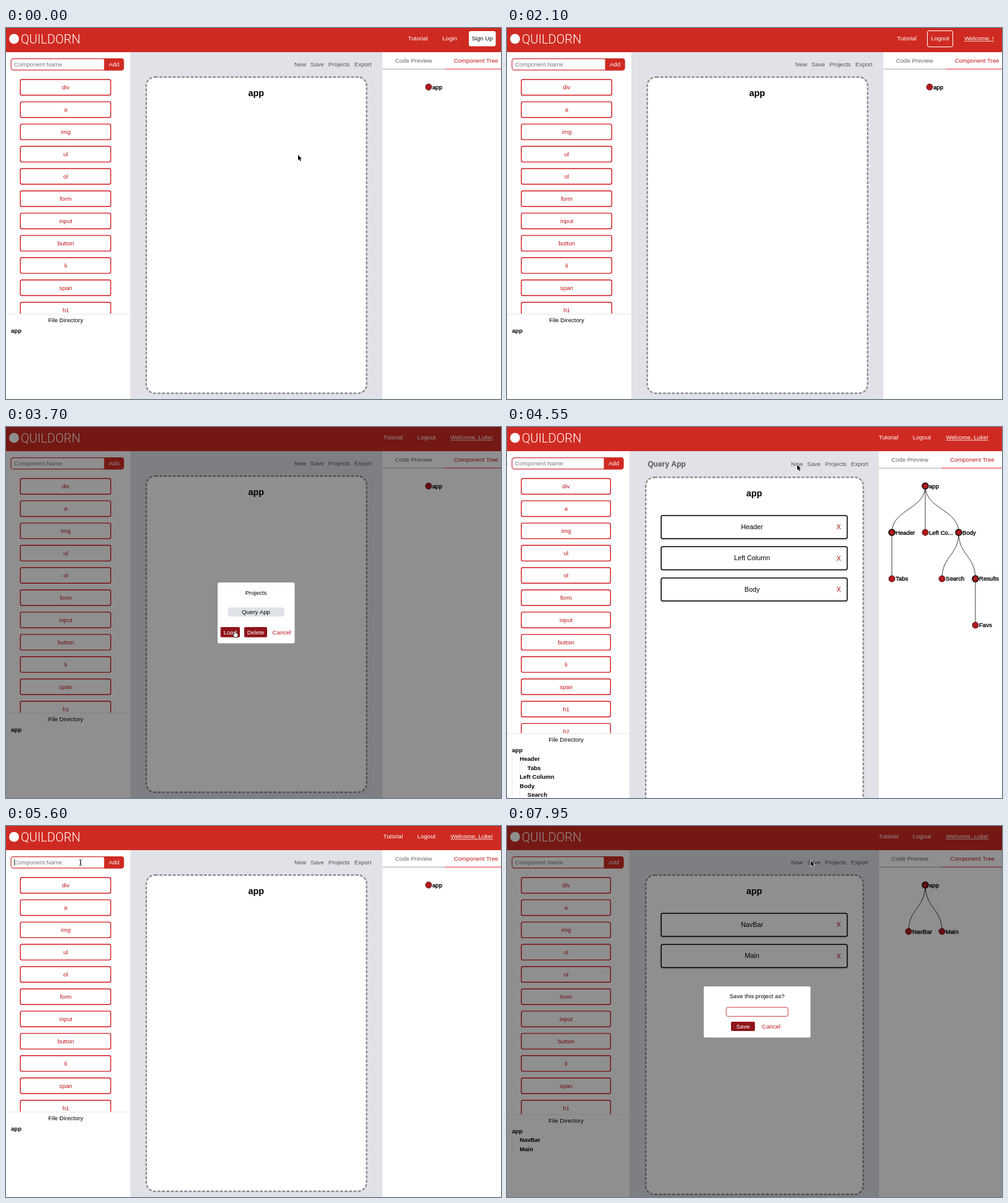
Animation, 800 px wide and 599 px high, one loop 8000 ms. Source, as an HTML page with a canvas:

```html
<!DOCTYPE html>
<html lang="en">
<head>
<meta charset="utf-8">
<title>Component builder</title>
<style>
html, body { margin: 0; width: 100%; height: 100%; overflow: hidden; background: #fff; }
canvas { display: block; width: 800px; height: 599px; }
</style>
</head>
<body>
<canvas id="stage"></canvas>
<script>
const LOOP = 8000;
const SANS = '"Liberation Sans", Arial, sans-serif';
const BRAND = 'Quildorn', USER = 'Luke';
const RED = '#cf2a22', LINE_RED = '#d4191f', TEXT_RED = '#c01418', DARK_RED = '#8f1419', NODE_RED = '#b01a1e';

const canvas = document.getElementById('stage');
const ctx = canvas.getContext('2d');
const ratio = window.devicePixelRatio || 1;
canvas.width = 800 * ratio;
canvas.height = 599 * ratio;

// nodes: name, x offset from the root, depth, parent index
const EMPTY = { narrow: false, title: '', dirTop: 462, bottom: 590, nodes: [['app', 0, 0]] };
const QUERY = {
  narrow: true, title: 'Query App', dirTop: 495, bottom: 640,
  nodes: [['app', 0, 0], ['Header', -54, 1, 0], ['Tabs', -54, 2, 1], ['Left Column', 0, 1, 0],
    ['Body', 54, 1, 0], ['Search', 27, 2, 4], ['Results', 81, 2, 4], ['Favs', 81, 3, 6]]
};
const ONE = { ...EMPTY, nodes: [['app', 0, 0], ['NavBar', 0, 1, 0]] };
const TWO = {
  narrow: true, title: '', dirTop: 466, bottom: 595,
  nodes: [['app', 0, 0], ['NavBar', -27, 1, 0], ['Main', 27, 1, 0]]
};
const PROJECTS = [[0, EMPTY], [3800, QUERY], [4900, EMPTY], [6350, ONE], [7050, TWO]];

// pointer: time, x, y
const POINTER = [[0, 472, 205], [50, 472, 205], [600, 716, 14], [2250, 716, 14], [2700, 540, 57],
  [2850, 540, 57], [3250, 404, 297], [3400, 404, 297], [3650, 370, 330], [4100, 370, 330],
  [4500, 469, 61], [4900, 469, 61], [5550, 120.5, 59], [7150, 120.5, 59], [7700, 491, 56], [8000, 491, 56]];
const TYPING = [[900, 2250], [5750, 7150]];

const within = (t, a, b) => t >= a && t < b;
const clamp = v => Math.max(0, Math.min(1, v));
const typed = (t, start, word, step) => word.slice(0, Math.max(0, Math.floor((t - start) / step) + 1));

function text(s, x, y, { color = '#000', size = 9.6, align = 'center', bold = false } = {}) {
  ctx.font = `${bold ? 'bold ' : ''}${size}px ${SANS}`;
  ctx.textAlign = align;
  ctx.fillStyle = color;
  ctx.fillText(s, x, y + size * 0.35);
  return ctx.measureText(s).width;
}

function rect(x1, y1, x2, y2, color) {
  ctx.fillStyle = color;
  ctx.fillRect(x1, y1, x2 - x1, y2 - y1);
}

function box(x1, y1, x2, y2, radius, fill, stroke, width = 1) {
  const inset = stroke ? width / 2 : 0;
  ctx.beginPath();
  ctx.roundRect(x1 + inset, y1 + inset, x2 - x1 - 2 * inset, y2 - y1 - 2 * inset, radius);
  if (fill) { ctx.fillStyle = fill; ctx.fill(); }
  if (stroke) { ctx.strokeStyle = stroke; ctx.lineWidth = width; ctx.stroke(); }
}

function button(label, x1, y1, x2, y2) {
  box(x1, y1, x2, y2, 2, DARK_RED);
  text(label, (x1 + x2) / 2, (y1 + y2) / 2, { color: '#fff' });
}

function drawHeader(t, narrow) {
  rect(0, 0, 800, 39, RED);
  ctx.beginPath();
  ctx.arc(13, 17.5, 8, 0, 7);
  ctx.fillStyle = '#fff';
  ctx.fill();
  ctx.font = '300 20px Roboto, sans-serif';
  ctx.textAlign = 'left';
  ctx.fillText(BRAND.toUpperCase(), 24, 24.6);

  const white = { color: '#fff' };
  if (t < 1850) {
    text('Tutorial', 665.5, 17, white);
    text('Login', 717, 17, white);
    box(748, 5, 791.5, 29.5, 3, '#fff');
    text('Sign Up', 769.5, 17, { color: '#111' });
    return;
  }
  const named = t >= 2150;
  const shift = narrow ? -9 : 0;
  const logout = (named ? 679.5 : 700) + shift;
  text('Tutorial', logout - 54, 17, white);
  text('Logout', logout, 17, white);
  if (within(t, 1900, 2750)) box(logout - 21, 4, logout + 21, 31, 2.5, null, '#fff', 1);
  const right = 787 + shift;
  const width = text(`Welcome, ${named ? USER : ''}!`, right, 17, { color: '#fff', align: 'right' });
  rect(right - width, 21.3, right, 22, '#fff');
}

function drawPalette(t, project) {
  const right = project.narrow ? 188.5 : 190.5;
  const middle = project.narrow ? 95.5 : 96.5;
  const split = right - 32;
  box(7.5, 49, right, 68.5, 4, '#fff', '#cd3034', 1.2);
  box(split, 49, right, 68.5, [0, 4, 4, 0], RED);
  text('Add', (split + right) / 2, 58.5, { color: '#fff' });

  let value = '';
  if (within(t, 5750, 6350)) value = typed(t, 5750, 'NavBar', 70);
  if (within(t, 6600, 7050)) value = typed(t, 6600, 'Main', 80);
  const width = value ? text(value, 13, 58.5, { align: 'left', color: '#222' }) : 0;
  if (!value) text('Component Name', 13, 58.5, { align: 'left', color: '#777' });
  if (within(t, 5550, 7750)) rect(13 + width, 53, 13.8 + width, 64, '#222');

  const names = ['div', 'a', 'img', 'ul', 'ol', 'form', 'input', 'button', 'li', 'span', 'h1', 'h2'];
  names.forEach((name, i) => {
    const y = 82.5 + 35.95 * i;
    box(22.5, y, right - 20.5, y + 26.7, 2.5, '#fff', LINE_RED, 1.4);
    text(name, middle, y + 13.2, { color: TEXT_RED });
  });
}

function drawDirectory({ dirTop, narrow, nodes }) {
  const edge = narrow ? 198 : 201;
  rect(0, dirTop - 0.5, edge, 599, '#fff');
  rect(0, dirTop - 0.5, edge, dirTop + 0.3, '#ddd');
  text('File Directory', narrow ? 95.5 : 96.5, dirTop + 9.7);
  nodes.forEach(([name, , depth], i) => {
    const y = dirTop + 26.7 + 14.4 * i;
    for (let d = 0; d < depth; d++) rect(8 + 12.5 * d, y - 7.2, 8.6 + 12.5 * d, y + 7.2, '#ddd');
    text(name, 8 + 12.5 * depth, y, { align: 'left', bold: true });
  });
}

function drawWorkspace({ narrow, title, bottom, nodes }) {
  const [left, right] = narrow ? [198, 601] : [201, 608.5];
  rect(left, 39, right, 599, '#e0e2e8');
  const drop = title ? 2 : 0;
  const shift = narrow ? -7 : 0;
  [['New', 466], ['Save', 492], ['Projects', 521], ['Export', 563]].forEach(([label, x]) =>
    text(label, x + shift, 58.3 + drop * 0.7, { align: 'left', color: '#555' }));
  if (title) text(title, 227.5, 59.7, { align: 'left', bold: true, size: 12, color: '#555' });

  const [x1, x2] = narrow ? [223, 577] : [225.5, 584];
  ctx.setLineDash([4.8, 2.4]);
  box(x1, 78 + drop, x2, bottom + 1, 14, '#fff', '#8c8e94', 2.4);
  ctx.setLineDash([]);
  text('app', (x1 + x2) / 2 - 0.5, 104.5 + drop, { size: 14.4, bold: true });

  nodes.filter(node => node[2] === 1).forEach(([name], i) => {
    const y = 140.3 + drop + 50.3 * i;
    const end = x2 - 26.5;
    ctx.save();
    ctx.shadowColor = 'rgba(0,0,0,.25)';
    ctx.shadowBlur = 3 * ratio;
    ctx.shadowOffsetY = ratio;
    box(x1 + 25.5, y, end, y + 38.7, 2.5, '#fff');
    ctx.restore();
    box(x1 + 25.5, y, end, y + 38.7, 2.5, '#fff', '#000', 1.5);
    text(name, (x1 + x2) / 2 - 4, y + 19, { size: 10.8 });
    text('X', end - 14.5, y + 19.2, { size: 10.8, color: '#a8181c' });
  });
}

function drawTree({ narrow, nodes }) {
  const left = narrow ? 601 : 608.5;
  const split = left + 101;
  rect(left, 39, 800, 599, '#fff');
  rect(left, 65.8, split, 66.8, '#a5a5a8');
  rect(split, 65.8, 800, 66.8, '#e02a30');
  text('Code Preview', left + 20.3, 52.3, { align: 'left', color: '#666' });
  text('Component Tree', left + 115.2, 52.3, { align: 'left', color: TEXT_RED });

  const root = narrow ? 676 : 683;
  const place = ([, dx, depth]) => [root + dx, 95.3 + 74.9 * depth];
  ctx.strokeStyle = '#222';
  ctx.lineWidth = 0.9;
  nodes.slice(1).forEach(node => {
    const [px, py] = place(nodes[node[3]]), [x, y] = place(node), mid = (py + y) / 2;
    ctx.beginPath();
    ctx.moveTo(px, py);
    ctx.bezierCurveTo(px, mid, x, mid, x, y);
    ctx.stroke();
  });
  nodes.forEach((node, i) => {
    const [x, y] = place(node);
    const parent = nodes.some(other => other[3] === i);
    ctx.beginPath();
    ctx.arc(x, y, 5, 0, 7);
    ctx.fillStyle = NODE_RED;
    ctx.fill();
    ctx.strokeStyle = parent ? '#000' : '#4a1012';
    ctx.lineWidth = parent ? 1.5 : 0.9;
    ctx.stroke();
    const label = node[0].length > 10 ? node[0].slice(0, 7) + '...' : node[0];
    text(label, x + 6, y, { align: 'left' });
    ctx.strokeStyle = '#000';
    ctx.lineWidth = 0.35;
    ctx.strokeText(label, x + 6, y + 9.6 * 0.35);
  });
}

function drawField(label, y, value, focused) {
  box(349, y, 459.5, y + 25.5, 2.5, null, '#a4a4a8', 0.9);
  ctx.font = `7.2px ${SANS}`;
  rect(355, y - 1, 359 + ctx.measureText(label).width, y + 2, '#fff');
  text(label, 357, y + 0.6, { align: 'left', size: 7.2 });
  const width = value ? text(value, 354.5, y + 12.7, { align: 'left' }) : 0;
  if (focused) rect(354.3 + width, y + 7, 355.1 + width, y + 18.5, '#000');
}

function loginDialog(t) {
  box(339.5, 231.5, 468.7, 369, 6, '#fff');
  text(`${BRAND} Login`, 404, 247.5);
  drawField('Username', 261.7, typed(t, 900, USER.toLowerCase(), 80), t < 1300);
  drawField('Password', 295.7, typed(t, 1350, '••••••••', 45), t >= 1300);
  button('Login', 349, 328.3, 382, 354.5);
  text('Cancel', 438.5, 341.3, { color: TEXT_RED });
}

function projectsDialog() {
  box(342, 251, 466.5, 349.3, 2.5, '#fff');
  text('Projects', 404, 267.5);
  box(358.7, 291.5, 449.7, 306, 2.5, '#dfe2e6');
  text('Query App', 404, 298.5);
  button('Load', 346.7, 323, 378, 339.5);
  button('Delete', 385, 323, 422, 339.5);
  text('Cancel', 445.5, 331.2, { color: TEXT_RED });
}

function saveDialog() {
  box(318, 259, 490.5, 341.5, 2.5, '#fff');
  text('Save this project as?', 404, 275);
  box(353.7, 292.3, 454.7, 307.8, 3, '#fff', '#cd3a3e', 1);
  button('Save', 362, 316, 400.7, 331);
  text('Cancel', 427, 323.4, { color: TEXT_RED });
}

const DIALOGS = [[550, 1850, loginDialog], [2750, 3800, projectsDialog], [7800, 9000, saveDialog]];

function drawDialogs(t) {
  for (const [start, end, draw] of DIALOGS) {
    const alpha = Math.min(clamp((t - start) / 100), clamp((end + 75 - t) / 75));
    if (!alpha) continue;
    ctx.globalAlpha = alpha;
    rect(0, 0, 800, 599, 'rgba(0,0,0,.44)');
    draw(t);
    ctx.globalAlpha = 1;
  }
}

const ARROW = new Path2D('M0 0V8.6L2 6.8 3.4 10 4.9 9.3 3.5 6.3H6.2Z');
const HAND = new Path2D('M-.8 0Q0-.9.8 0V3L3.6 3.6Q4.8 4 4.6 5.2L3.8 9H-.8L-3.2 5.6Q-3.2 4.4-2 4.8L-.8 5.8Z');
const IBEAM = new Path2D('M-2-4.5Q0-4.5 0-3.5Q0-4.5 2-4.5M0-3.5V3.5M-2 4.5Q0 4.5 0 3.5Q0 4.5 2 4.5M-1 1H1');

function drawPointer(t) {
  if (TYPING.some(([a, b]) => within(t, a, b))) return;
  const i = POINTER.findIndex(key => key[0] > t);
  const [t0, x0, y0] = POINTER[i - 1], [t1, x1, y1] = POINTER[i];
  const p = (t - t0) / (t1 - t0), ease = p * p * (3 - 2 * p);
  const x = x0 + (x1 - x0) * ease, y = y0 + (y1 - y0) * ease;
  ctx.save();
  ctx.translate(x, y);
  ctx.lineJoin = 'round';
  if (x < 158 && y > 49 && y < 69) {
    ctx.strokeStyle = '#000';
    ctx.lineWidth = 1;
    ctx.stroke(IBEAM);
  } else {
    const hand = within(t, 3600, 3800);
    ctx.strokeStyle = hand ? '#000' : '#fff';
    ctx.fillStyle = hand ? '#fff' : '#000';
    ctx.lineWidth = 1.3;
    ctx.stroke(hand ? HAND : ARROW);
    ctx.fill(hand ? HAND : ARROW);
  }
  ctx.restore();
}

function render(now) {
  const t = now % LOOP;
  const project = PROJECTS.filter(([start]) => t >= start).pop()[1];
  ctx.setTransform(ratio, 0, 0, ratio, 0, 0);
  rect(0, 0, 800, 599, '#fff');
  drawPalette(t, project);
  drawDirectory(project);
  drawWorkspace(project);
  drawTree(project);
  drawHeader(t, project.narrow);
  drawDialogs(t);
  drawPointer(t);
}

const begin = performance.now();
(function tick() {
  render(performance.now() - begin);
  requestAnimationFrame(tick);
})();
</script>
</body>
</html>
```
